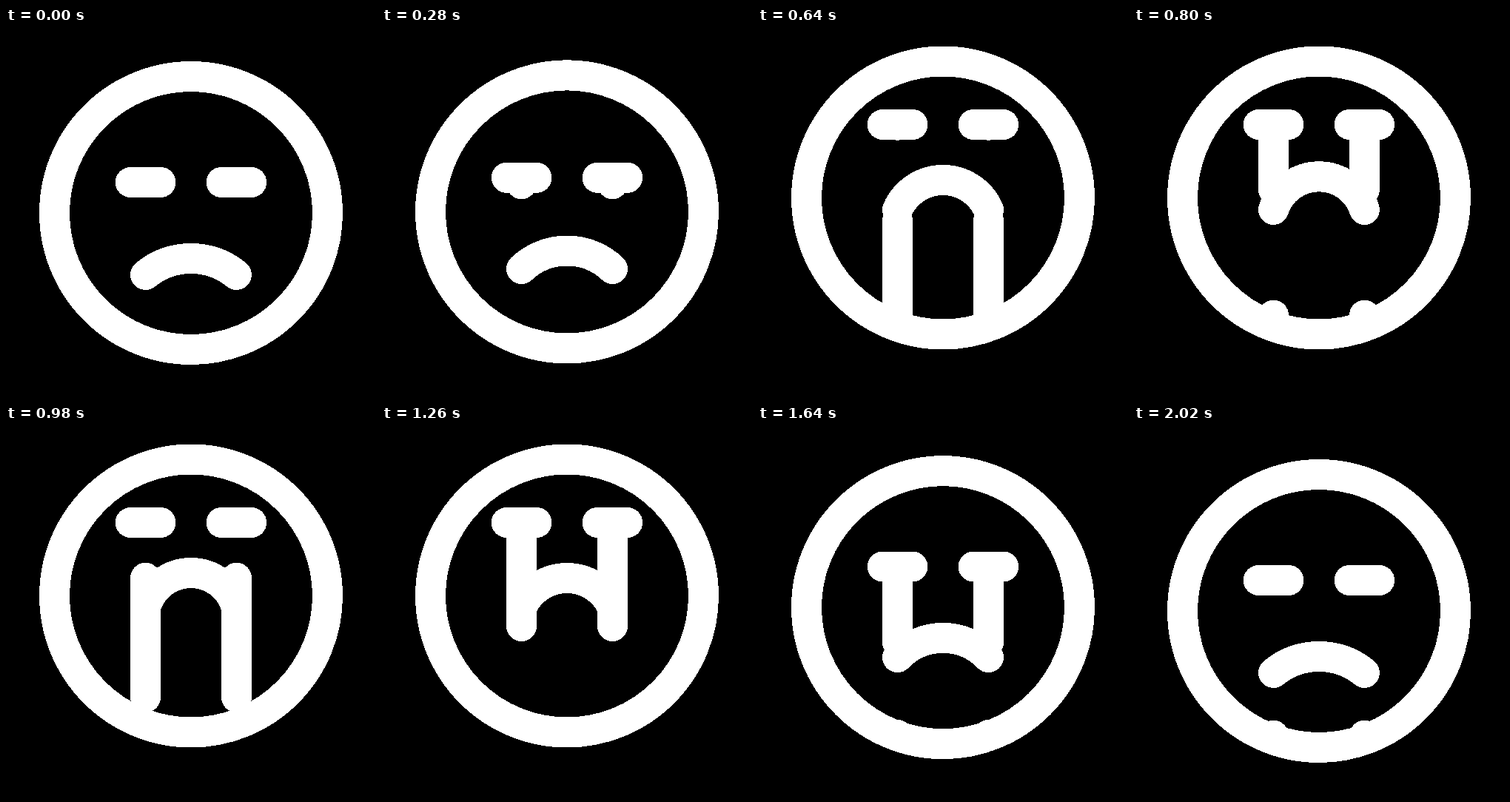
Animation, 500 px wide and 500 px high, one loop 2640 ms. Source, as an HTML page:

```html
<!DOCTYPE html>
<html lang="en">
<head>
<meta charset="utf-8">
<title>Crying face</title>
<style>
  html, body { margin: 0; width: 100%; height: 100%; overflow: hidden; background: #000; }
  svg { display: block; width: 100vw; height: 100vh; }
</style>
</head>
<body>
<svg viewBox="0 0 500 500" fill="none" stroke="#fff" stroke-width="41"
     stroke-linecap="round" shape-rendering="crispEdges">
  <circle id="head" cx="250" cy="250" r="184.5"/>
  <path id="eyes"/>
  <path id="mouth"/>
  <path id="tears"/>
</svg>
<script>
const LOOP = 2640, STEP = 20;
const RISE = 226, FALL = 1426, MOVE = 313;
const TEAR_GAP = 400, TEAR_COUNT = 4;
const LEFT = 188.5, RIGHT = 311.5;

const [head, eyes, mouth, tears] =
  ['head', 'eyes', 'mouth', 'tears'].map(id => document.getElementById(id));

// Smooth 0 to 1 progress over a time span
const ease = (t, start, length) => {
  const x = Math.min(1, Math.max(0, (t - start) / length));
  return x * x * (3 - 2 * x);
};

// How far the face is lifted, 0 at rest and 1 at the top
const lift = (t, riseTime) => ease(t, RISE, riseTime) - ease(t, FALL, MOVE);

function mouthPath(t) {
  const pulse = ease(t, 626, 300) - ease(t, 926, 300);
  const middle = 311.5 - 106 * lift(t, 277) - 7.6 * pulse;
  const end = 333.5 - 88 * lift(t, 290);
  const half = (RIGHT - LEFT) / 2;
  const sag = end - middle;
  const radius = (half * half + sag * sag) / (2 * sag);
  return `M${LEFT} ${end}A${radius} ${radius} 0 0 1 ${RIGHT} ${end}`;
}

function tearPath(t, eyeY, floorY) {
  let d = '';
  for (let i = 0; i < TEAR_COUNT; i++) {
    const age = t - RISE - i * TEAR_GAP;
    const tail = ease(age, 206, 430);
    const tip = ease(age, 0, 460);
    if (tip <= 0 || tail >= 1) continue;
    const y = part => eyeY + (floorY - eyeY) * part;
    for (const x of [LEFT, RIGHT]) d += `M${x} ${y(tail)}V${y(tip)}`;
  }
  return d;
}

function draw(t) {
  const up = lift(t, MOVE);
  const headY = 250 - 20.5 * up;
  const eyeY = 208.5 - 78 * up;
  head.setAttribute('cy', headY);
  eyes.setAttribute('d', `M168.3 ${eyeY}H208.9M291.1 ${eyeY}H331.7`);
  mouth.setAttribute('d', mouthPath(t));
  tears.setAttribute('d', tearPath(t, eyeY, headY + 174));
}

const origin = performance.now();
function tick() {
  const t = (performance.now() - origin) % LOOP;
  draw(Math.floor(t / STEP) * STEP);
  requestAnimationFrame(tick);
}
tick();
</script>
</body>
</html>
```
